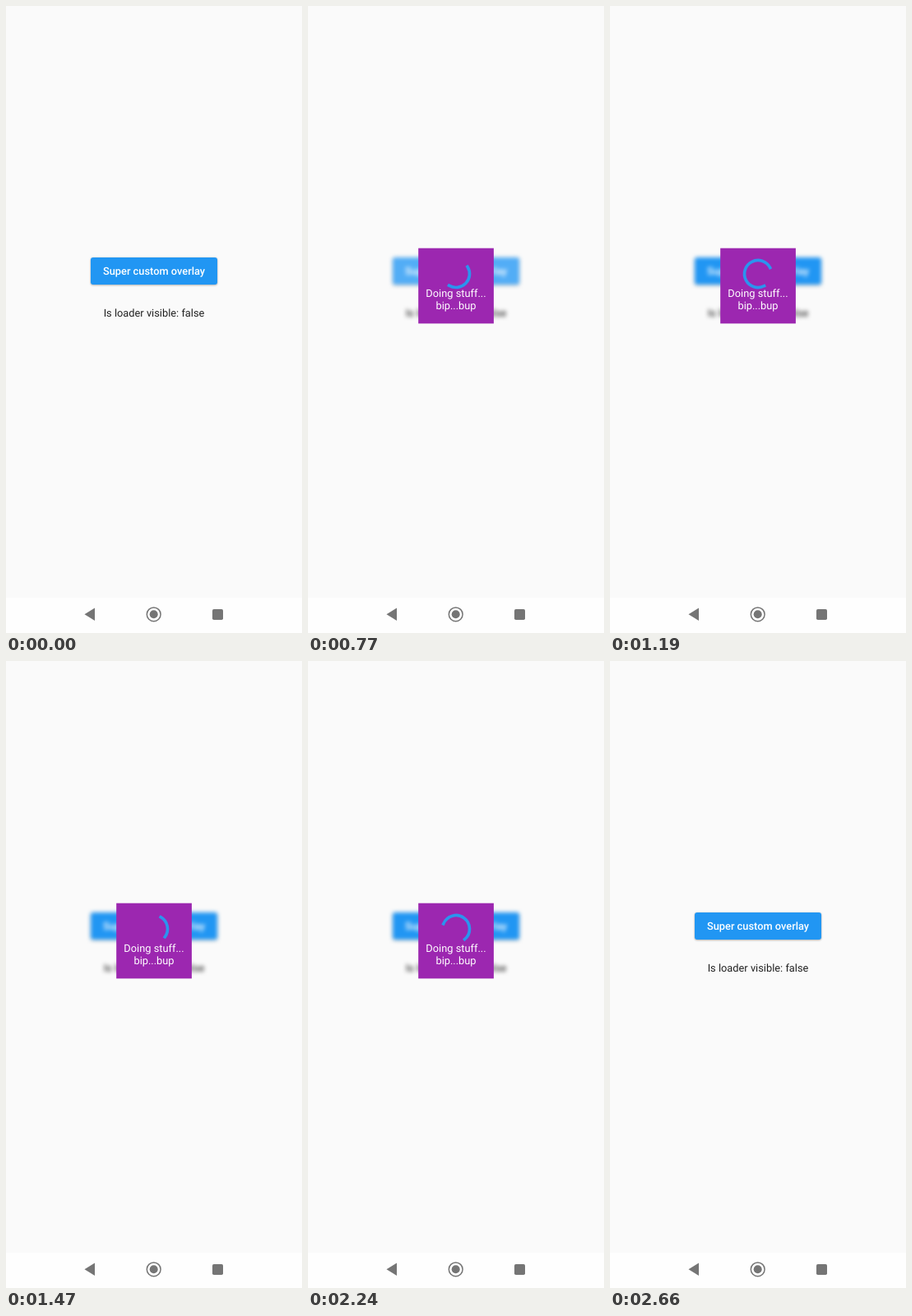
These frames come from a looping animation (360x763 px, 2.87 s). An HTML page:

```html
<!DOCTYPE html>
<html lang="en">
<head>
<meta charset="utf-8">
<title>Custom overlay</title>
<style>
  html, body { margin: 0; width: 100%; height: 100%; overflow: hidden; background: #fafafa; }
  svg { display: block; width: 100vw; height: 100vh; }
  text {
    font: 400 12.83px Roboto, "Liberation Sans", sans-serif;
    text-anchor: middle;
    text-rendering: geometricPrecision;
  }
  #page.blurred { filter: blur(2.6px); }
  .button {
    filter: drop-shadow(0 1px .8px rgba(0, 0, 0, .24)) drop-shadow(0 .6px 1px rgba(0, 0, 0, .12));
  }
  .button + rect + text { font-weight: 500; fill: #fff; }
  .status { fill: rgba(0, 0, 0, .87); }
  #loader text { fill: #fff; }
  #arc { fill: none; stroke: #2b94ee; stroke-width: 3.67; stroke-linecap: square; }
</style>
</head>
<body>
<svg viewBox="0 0 360 763" preserveAspectRatio="none">
  <rect width="360" height="763" fill="#fafafa"/>
  <g id="page">
    <rect class="button" x="103" y="306" width="154" height="33" rx="3" fill="#2196f3"/>
    <rect id="splash" x="103" y="306" width="154" height="33" rx="3" fill="#fff" opacity="0"/>
    <text x="180" y="327">Super custom overlay</text>
    <text class="status" x="180" y="378.3">Is loader visible: false</text>
  </g>
  <g id="loader" visibility="hidden">
    <rect x="134.2" y="294.7" width="91.7" height="91.7" fill="#9c27b0"/>
    <path id="arc"/>
    <text x="180" y="354.4">Doing stuff...</text>
    <text x="180" y="369.4">bip...bup</text>
  </g>
  <rect y="720" width="360" height="43" fill="#fefefe"/>
  <g fill="#757575">
    <path d="M95.5 740.3L108 732.6V748Z"/>
    <circle cx="179.7" cy="740.3" r="8.4" fill="none" stroke="#757575" stroke-width="1.5"/>
    <circle cx="179.7" cy="740.3" r="5"/>
    <rect x="251" y="734" width="13" height="13" rx="1.8"/>
  </g>
</svg>
<script>
const LOOP = 2870, STEP = 70, SHOW = 490, HIDE = 2590;
const PATH = 1333, TURN = 2222;
const CX = 180, CY = 326, R = 16.5;
const $ = id => document.getElementById(id);
const page = $('page'), splash = $('splash'), loader = $('loader'), arc = $('arc');

// [loop time, value] pairs
const spinClock = [[490, 0], [770, 252], [1190, 665], [1820, 1290], [2240, 1664], [2590, 2005]];
const splashAlpha = [[419, 0], [420, .07], [490, .12], [770, .22], [1100, 0]];

function lerpKeys(keys, t) {
  if (t <= keys[0][0]) return keys[0][1];
  for (let i = 1; i < keys.length; i++) {
    const [a, u] = keys[i - 1], [b, v] = keys[i];
    if (t <= b) return u + (v - u) * (t - a) / (b - a);
  }
  return keys[keys.length - 1][1];
}

// cubic-bezier(.4, 0, .2, 1)
function ease(x) {
  if (x <= 0) return 0;
  if (x >= 1) return 1;
  let lo = 0, hi = 1, s;
  for (let i = 0; i < 24; i++) {
    s = (lo + hi) / 2;
    const bx = 1.2 * s * (1 - s) ** 2 + .6 * s * s * (1 - s) + s ** 3;
    if (bx < x) lo = s; else hi = s;
  }
  return 3 * s * s * (1 - s) + s ** 3;
}

function point(angle) {
  return (CX + R * Math.cos(angle)).toFixed(3) + ' ' + (CY + R * Math.sin(angle)).toFixed(3);
}

function drawArc(t) {
  const p = t % PATH / PATH;
  const head = ease(p * 2), tail = ease(p * 2 - 1);
  const start = Math.PI * (-.5 + 1.5 * tail + 2 * t / TURN + .5 * p);
  const sweep = Math.max(1.5 * Math.PI * (head - tail), .01);
  arc.setAttribute('d',
    `M${point(start)}A${R} ${R} 0 ${sweep > Math.PI ? 1 : 0} 1 ${point(start + sweep)}`);
}

function render(now) {
  const t = Math.floor(now % LOOP / STEP) * STEP;
  const open = t >= SHOW && t < HIDE;
  page.classList.toggle('blurred', open);
  loader.setAttribute('visibility', open ? 'visible' : 'hidden');
  splash.setAttribute('opacity', lerpKeys(splashAlpha, t));
  if (open) drawArc(lerpKeys(spinClock, t));
}

const begin = performance.now();
function tick() {
  render(performance.now() - begin);
  requestAnimationFrame(tick);
}
tick();
</script>
</body>
</html>
```
